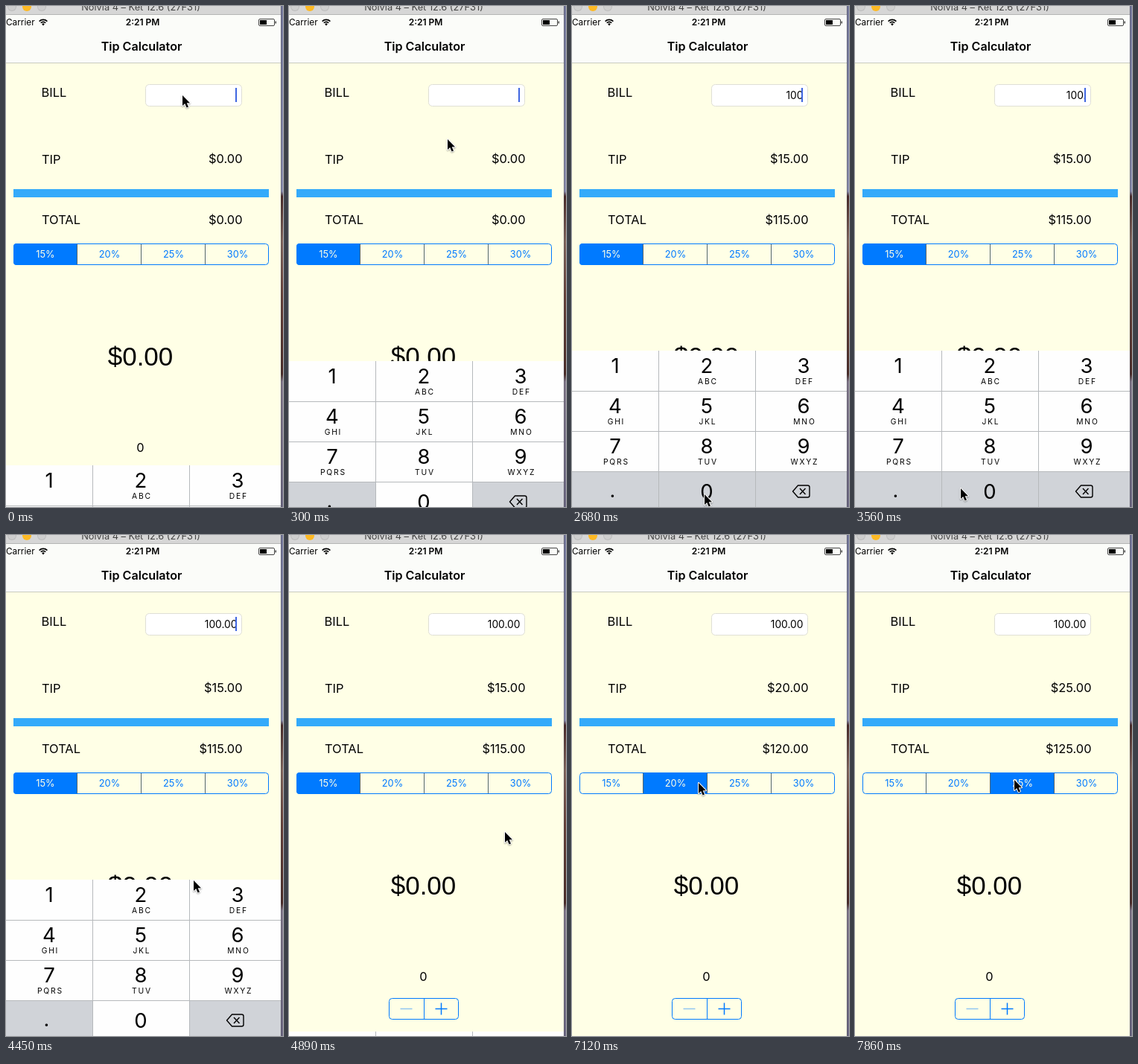
Recreate the animation shown at these times as an HTML page with a canvas. Size 372 px wide and 673 px high, loop 8 s.

```html
<!DOCTYPE html>
<html lang="en">
<head>
<meta charset="utf-8">
<title>Tip Calculator</title>
<style>
  html, body { margin: 0; width: 100%; height: 100%; overflow: hidden; background: #ffffe6; }
  canvas { display: block; width: 372px; height: 673px; }
</style>
</head>
<body>
<canvas id="stage" width="372" height="673"></canvas>
<script>
const ctx = document.getElementById('stage').getContext('2d');
const LOOP = 8000, STEP = 148, LAST = 53;
const BLUE = '#007aff', CREAM = '#ffffe6', GREY = '#d0d3d8';
const SANS = 'Inter, Roboto, sans-serif';

// Each list holds [step, value]; a value lasts until the next entry.
const BILL = [[0, ''], [10, '1'], [16, '10'], [18, '100'], [23, '100.'], [26, '100.0'], [28, '100.00']];
const PRESSED = [[0, ''], [9, '1'], [10, ''], [15, '0'], [19, ''], [22, '.'], [23, ''], [24, '0'], [29, '']];
const RATE = [[0, 0.15], [45, 0.2], [52, 0.25]];
const SEGMENT = [[0, 0], [46, 1], [53, 2]];
const POINTER = [
  [0, 237, 120], [8, 85, 499], [10, 85, 499], [15, 178, 656], [19, 178, 656],
  [21, 58, 652], [23, 58, 652], [24, 142, 648], [28, 142, 648], [31, 290, 399],
  [36, 290, 399], [38, 287, 406], [43, 146, 335], [46, 146, 335], [51, 214, 329]
];
const KEYS = [
  ['1', ''], ['2', 'ABC'], ['3', 'DEF'],
  ['4', 'GHI'], ['5', 'JKL'], ['6', 'MNO'],
  ['7', 'PQRS'], ['8', 'TUV'], ['9', 'WXYZ'],
  ['.', ''], ['0', ''], ['del', '']
];
const COL_X = [0, 116, 246, 369], KEY_X = [58, 181, 311], ROW = 54;

const at = (list, step) => list.filter(e => e[0] <= step).pop()[1];

function pointerAt(step) {
  const i = POINTER.findIndex(p => p[0] > step);
  if (i < 0) return POINTER[POINTER.length - 1].slice(1);
  const [s0, x0, y0] = POINTER[i - 1], [s1, x1, y1] = POINTER[i];
  const u = (step - s0) / (s1 - s0), e = u * u * (3 - 2 * u);
  return [Math.round(x0 + (x1 - x0) * e), Math.round(y0 + (y1 - y0) * e)];
}

function keyboardTop(step) {
  if (step < 33) return Math.round(463 + 154 * Math.exp(-1.2 * step));
  return step === 33 ? 667 : 673;
}

function rect(x, y, w, h, color) {
  ctx.fillStyle = color;
  ctx.fillRect(x, y, w, h);
}

function box(x, y, w, h, r, stroke, fill) {
  ctx.beginPath();
  ctx.roundRect(x, y, w, h, r);
  if (fill) { ctx.fillStyle = fill; ctx.fill(); }
  if (stroke) { ctx.strokeStyle = stroke; ctx.lineWidth = 1; ctx.stroke(); }
}

function disc(x, y, r, color) {
  ctx.fillStyle = color;
  ctx.beginPath();
  ctx.arc(x, y, r, 0, 7);
  ctx.fill();
}

function lines(color, width, ...paths) {
  ctx.strokeStyle = color;
  ctx.lineWidth = width;
  ctx.beginPath();
  for (const [x0, y0, x1, y1] of paths) { ctx.moveTo(x0, y0); ctx.lineTo(x1, y1); }
  ctx.stroke();
}

function text(str, x, y, size, o = {}) {
  ctx.font = `${o.weight || 400} ${size}px ${o.family || SANS}`;
  ctx.textAlign = o.align || 'left';
  ctx.letterSpacing = (o.spacing || 0) + 'px';
  ctx.fillStyle = o.color || '#000';
  ctx.fillText(str, x, y);
}

function drawDesktop() {
  const g = ctx.createLinearGradient(0, 0, 0, 673);
  [[0, '#777b9e'], [0.37, '#8d90b0'], [0.38, '#4b2a27'], [0.47, '#85695f'],
   [0.58, '#694239'], [0.735, '#4b2c27'], [0.75, '#857c8e'], [1, '#6e6a84']]
    .forEach(([p, c]) => g.addColorStop(p, c));
  rect(369, 0, 3, 673, g);
  rect(369, 0, 1, 673, 'rgba(60,60,75,.45)');
}

function drawWindow() {
  rect(0, 0, 369, 11, '#d6d6d6');
  rect(0, 11, 369, 1, '#b5b5b5');
  disc(8, 1, 6, '#bdbdbd');
  disc(8, 1, 5, '#cecece');
  disc(28, 1, 6, '#fdb924');
  disc(48, 1, 6, '#bdbdbd');
  disc(48, 1, 5, '#cecece');
  text('Nolvia 4 – Ket 12.6 (27F31)', 181, 6, 12.8, { align: 'center', color: '#444' });
}

function drawBars() {
  rect(0, 12, 369, 64, '#fbfcf9');
  rect(0, 76, 369, 1, '#c9cbc0');
  text('Carrier', 0, 26, 11.8);
  text('2:21 PM', 183.5, 26, 12, { weight: 600, align: 'center' });
  text('Tip Calculator', 182, 60, 16.1, { weight: 600, align: 'center' });

  ctx.strokeStyle = '#000';
  ctx.lineWidth = 1.6;
  for (const r of [4.6, 7.6]) {
    ctx.beginPath();
    ctx.arc(50, 26, r, -Math.PI * 0.75, -Math.PI * 0.25);
    ctx.stroke();
  }
  ctx.fillStyle = '#000';
  ctx.beginPath();
  ctx.moveTo(50, 26.5);
  ctx.arc(50, 26, 2.6, -Math.PI * 0.75, -Math.PI * 0.25);
  ctx.fill();

  box(339.5, 17.5, 21, 9, 1.5, '#444');
  rect(341, 19, 9, 6, '#000');
  rect(361.5, 20.5, 1.5, 3, '#444');
}

function drawSegments(selected) {
  ctx.save();
  ctx.beginPath();
  ctx.roundRect(10, 319, 343, 29, 4);
  ctx.clip();
  rect(10 + 86 * selected, 319, 86, 29, BLUE);
  ctx.restore();
  for (const x of [95, 181, 267]) rect(x, 320, 1, 27, '#55666f');
  box(10.5, 319.5, 342, 28, 4, BLUE);
  ['15%', '20%', '25%', '30%'].forEach((s, i) =>
    text(s, 53 + 86 * i, 338, 12.8, { align: 'center', color: i === selected ? CREAM : BLUE }));
}

function drawForm(step) {
  const bill = at(BILL, step), amount = Number(bill) || 0, tip = amount * at(RATE, step);
  const money = (v, y) => text('$' + v.toFixed(2), 317.5, y, 16.4, { align: 'right' });

  rect(0, 77, 369, 596, CREAM);
  text('BILL', 47.5, 122, 16.4);
  text('TIP', 48, 211.5, 16.4);
  text('TOTAL', 48, 292.5, 16.4);
  money(tip, 210.5);
  money(amount + tip, 292.5);
  rect(10, 246, 343, 11, '#34aafa');

  box(187.5, 105.5, 129, 29, 5, '#dfdfd6', '#fff');
  text(bill, 310.5, 125, 13.8, { align: 'right' });
  if (step < 31) rect(308, 110, 2, 19, '#3f66e0');

  drawSegments(at(SEGMENT, step));
  text('$0.00', 180.5, 483, 35, { align: 'center', family: '"Liberation Sans", Arial, sans-serif' });
  text('0', 180.5, 598.5, 16.4, { align: 'center' });

  box(134.5, 622.5, 93, 28, 4, BLUE);
  rect(181, 623, 1, 27, BLUE);
  lines('rgba(0,122,255,.45)', 1.4, [149.5, 636.5, 165.5, 636.5]);
  lines(BLUE, 1.5, [196.5, 636.5, 212.5, 636.5], [204.5, 628.5, 204.5, 644.5]);
}

function drawDelete(x, y) {
  ctx.strokeStyle = '#000';
  ctx.lineWidth = 1.4;
  ctx.lineJoin = 'round';
  ctx.beginPath();
  ctx.moveTo(x - 11, y);
  ctx.lineTo(x - 4, y - 8);
  ctx.lineTo(x + 9, y - 8);
  ctx.quadraticCurveTo(x + 11.5, y - 8, x + 11.5, y - 5.5);
  ctx.lineTo(x + 11.5, y + 5.5);
  ctx.quadraticCurveTo(x + 11.5, y + 8, x + 9, y + 8);
  ctx.lineTo(x - 4, y + 8);
  ctx.closePath();
  ctx.stroke();
  lines('#000', 1.4, [x - 1.5, y - 4, x + 6, y + 4], [x + 6, y - 4, x - 1.5, y + 4]);
}

function drawKeyboard(step) {
  const top = keyboardTop(step), pressed = at(PRESSED, step);
  if (top >= 673) return;
  KEYS.forEach(([label, sub], i) => {
    const col = i % 3, row = Math.floor(i / 3), y = top + row * ROW, x = KEY_X[col];
    const special = row === 3 && col !== 1;
    const grey = special !== (label === pressed);
    rect(COL_X[col], y, COL_X[col + 1] - COL_X[col], ROW, grey ? GREY : '#fefefe');
    if (label === 'del') drawDelete(307.5, y + 27);
    else if (label === '.') text(label, 54.5, y + 35, 27, { align: 'center' });
    else text(label, x, y + (row === 3 ? 37 : 30), 27.5, { align: 'center' });
    if (sub) text(sub, x + 1.4, y + 45, 10.3, { align: 'center', spacing: 1.8 });
  });
  for (const x of [116, 246]) rect(x, top, 1, 4 * ROW, '#b6b9bc');
  for (const r of [1, 2, 3]) rect(0, top + r * ROW, 369, 1, '#b6b9bc');
}

function drawPointer([x, y]) {
  const shape = new Path2D('M0 0V14L3.2 11L5.6 16.4L8 15.4L5.7 10.2H10Z');
  ctx.save();
  ctx.translate(x, y);
  ctx.lineJoin = 'round';
  ctx.shadowColor = 'rgba(0,0,0,.35)';
  ctx.shadowBlur = 2;
  ctx.shadowOffsetY = 1;
  ctx.strokeStyle = '#fff';
  ctx.lineWidth = 2;
  ctx.stroke(shape);
  ctx.shadowColor = 'transparent';
  ctx.fillStyle = '#000';
  ctx.fill(shape);
  ctx.restore();
}

function draw(ms) {
  const step = Math.min(LAST, Math.floor(ms / STEP));
  drawDesktop();
  drawWindow();
  drawForm(step);
  drawBars();
  drawKeyboard(step);
  drawPointer(pointerAt(step));
}

const start = performance.now();
function tick() {
  draw((performance.now() - start) % LOOP);
  requestAnimationFrame(tick);
}
tick();
</script>
</body>
</html>
```
